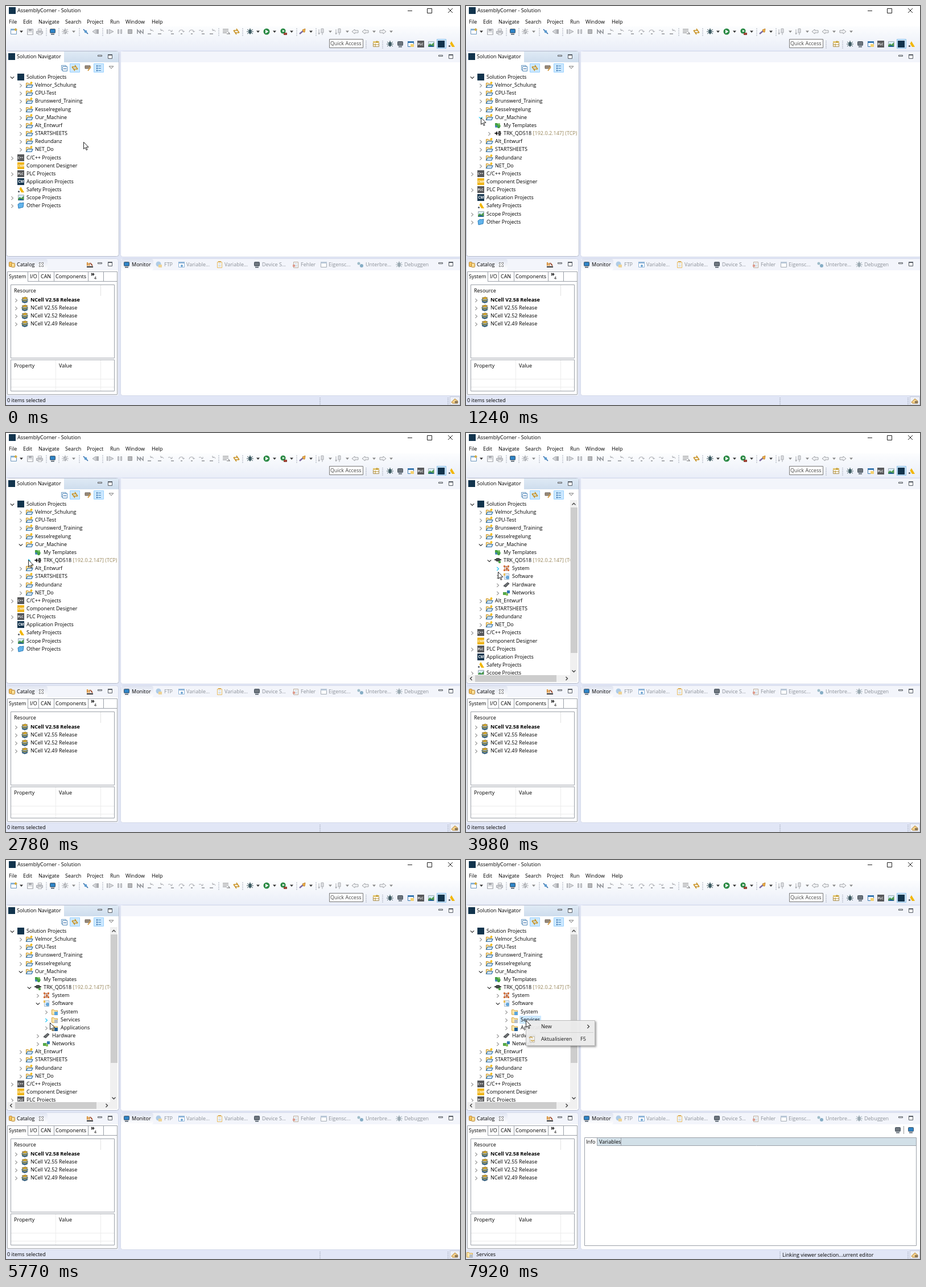
These frames come from a looping animation (798x702 px, 8 s). An HTML page with a canvas:

```html
<!DOCTYPE html>
<html lang="en">
<head>
<meta charset="utf-8">
<title>Project tree</title>
<style>
html, body { margin: 0; width: 100%; height: 100%; overflow: hidden; background: #e1e6f6; }
canvas { display: block; }
</style>
</head>
<body>
<canvas id="stage" width="798" height="702"></canvas>
<script>
const ctx = document.getElementById('stage').getContext('2d');
const LOOP = 8000, ROW = 14.15, TOP = 125;
const NAVY = '#12344d', GOLD = '#f2b705', GREY = '#a9abb0', DARK = '#555b63', BLUE = '#3d7fb8', LINE = '#b6bccc', BORDER = '#9ba0a8';
const OPEN_ROOT = 1230, OPEN_DEVICE = 3180, OPEN_SOFTWARE = 4610, SELECT = 6970, MENU = 7840;

// ---- drawing helpers ----
function box(x, y, w, h, fill, stroke, r = 0) {
  ctx.beginPath();
  ctx.roundRect(stroke ? x + .5 : x, stroke ? y + .5 : y, stroke ? w - 1 : w, stroke ? h - 1 : h, r);
  if (fill) { ctx.fillStyle = fill; ctx.fill(); }
  if (stroke) { ctx.strokeStyle = stroke; ctx.lineWidth = 1; ctx.stroke(); }
}
function path(d, fill, stroke, width = 1) {
  const p = new Path2D(d);
  if (fill) { ctx.fillStyle = fill; ctx.fill(p); }
  if (stroke) { ctx.strokeStyle = stroke; ctx.lineWidth = width; ctx.stroke(p); }
}
function dot(x, y, r, fill) {
  ctx.beginPath();
  ctx.arc(x, y, r, 0, 7);
  ctx.fillStyle = fill;
  ctx.fill();
}
function text(s, x, y, color = '#000', weight = 400, size = 9) {
  ctx.font = `${weight} ${size}px "Open Sans", sans-serif`;
  ctx.fillStyle = color;
  ctx.fillText(s, x, Math.round(y + 3.3));
  return ctx.measureText(s).width;
}
function at(x, y, draw) {
  ctx.save();
  ctx.translate(x, y);
  draw();
  ctx.restore();
}
const shape = (x, y, ...args) => at(x, y, () => path(...args));
const icon = (name, x, y) => at(x, y, icons[name]);
function shade(y0, y1, a, b) {
  const g = ctx.createLinearGradient(0, y0, 0, y1);
  g.addColorStop(0, a);
  g.addColorStop(1, b);
  return g;
}
function badge(s, fill) {
  box(-6, -6, 12, 12, fill);
  text(s, s.length > 2 ? -5.5 : -4.8, -1, '#fff', 700, s.length > 2 ? 5.5 : 6.5);
}
function folder(mark) {
  path('M-5.5 5V-3.5H-2L-1 -2H4.5V5Z', '#fbe7ad', '#d3a341');
  box(-1, 0, 6, 6, mark);
}
function screen(color) {
  box(-5, -5, 10, 8, color, '#44505c', 1);
  box(-3, 4, 6, 1.5, '#44505c');
}
function bug(color) {
  path('M-5 -4L5 4M5 -4L-5 4M-6 0H6M0 -6V5', '', color);
  ctx.beginPath();
  ctx.ellipse(0, 0, 2.5, 4, 0, 0, 7);
  ctx.fillStyle = color;
  ctx.fill();
}
function page(border, mark) {
  box(-4, -5, 9, 11, '#fff', border);
  path('M-2 -2H3M-2 1H3M-2 3H3', '', mark);
}
function frame(border, bar) {
  box(-5, -5, 11, 10, '#fff', border);
  box(-5, -5, 11, 3, bar);
}

const icons = {
  app: () => box(-6, -6, 12, 12, NAVY),
  solution() {
    path('M-5.5 4.5V-3.5H-2L-1 -2H4V1', '#fbe3a0', '#c8922e');
    path('M-5.5 4.5L-3 0H6L4 4.5Z', '#d5e9f8', '#2f6fa8', 1.2);
    path('M3.5 -6V-2M1.5 -4H5.5', '', GOLD, 1.5);
  },
  cpp: () => badge('C++', '#58595b'),
  plc: () => badge('PLC', '#58595b'),
  cm: () => badge('CM', '#16364f'),
  cmp: () => badge('CMP', '#f0b51a'),
  safety() {
    path('M-2.5 -1L0 -5L6 5H1Z', GOLD);
    dot(-3.5, 3.5, 1.6, DARK);
  },
  scope() {
    box(-5, -5, 11, 10, '#d9edf7', '#9eabb5');
    path('M-5 5V2L-2 -1L1 1L5 -3V5Z', '#4c9a4c');
    path('M-5 5L-1 2L5 4V5Z', '#1f5f94');
  },
  other: () => path('M-5 -2L-1 -5L0 -4L5 -5L4 3L-4 5Z', '#62b4ec', '#2b7cba'),
  templates() {
    path('M-5 -4H-1L1 -2H3L5 1L3 5H0L-3 1H-5Z', '#45a044');
    dot(-3, 2, 2, BLUE);
    dot(2, -2, 2, '#74bd5d');
  },
  device() {
    path('M-6 0H6', '', '#777', 2);
    path('M-5 0L-1 -4V4Z', '#222');
    box(1, -4, 4, 8, '#666', '#333');
  },
  linked() {
    path('M-6 -1H6', '', '#444', 2);
    box(-4, -4, 8, 6, '#46504c', '#333', 2);
    dot(3, 3, 2.3, '#55a84b');
  },
  system() {
    path('M-4 -3H4M-4 3H4M-3 -4V4M3 -4V4M0 -4V5', '', '#a5583a');
    for (const [x, y] of [[-4, -4], [3, -4], [-4, 3], [3, 3], [0, 0]]) box(x - 1, y - 1, 3, 3, '#d2703a');
  },
  software() {
    page('#9bb4ca', '#9fc4e5');
    dot(2, 2, 3, '#63a6d9');
    box(-5, -5, 3, 4, '#e9bd58');
  },
  hardware: () => path('M-5 2L2 -4L5 -2L-1 4Z', '#6e7275', '#3b3e41'),
  networks() {
    path('M-4 2L4 -2', '', '#777');
    box(-6, -1, 6, 5, '#55a84b');
    box(1, -4, 5, 5, '#3479b5');
    box(-1, 1, 4, 4, '#83bd55');
  },
  sysFolder: () => folder('#5ba6dc'),
  services: () => folder('#b6bdc5'),
  apps: () => folder('#1f5c94'),
  books() {
    path('M-5 -3L1 -5L5 -3L0 -1Z', '#f0b929', '#7a6324');
    path('M-5 -1L0 1L5 -1V1L0 3L-5 1Z', '#d9b03a', '#24505c');
    path('M-5 2L0 4L5 2V4L0 6L-5 4Z', '#1d4b6d');
  },
  catalog() {
    box(-5, -5, 6, 9, '#f6c45e', '#b9832c', 1);
    box(-1, -3, 7, 8, '#f8dd96', '#b9832c', 1);
  },
  monitor: () => screen('#2f83c5'),
  darkScreen: () => screen('#6d757d'),
  ftp() { dot(-1, -1, 4.5, '#aecbe5'); box(-1, 0, 6, 5, '#eed394'); },
  vars() { frame('#8fb5d8', '#8fb5d8'); dot(1, 2, 2, '#6fa5d2'); },
  clip() { page('#e3b75f', '#b9c6d2'); box(-2, -6, 5, 2, '#d8a64d'); },
  errors() { page('#b9aa9a', '#b3c4d5'); box(-5, 0, 4, 4, '#df9b8d'); },
  props: () => frame('#a3aab3', '#b8c7d7'),
  breaks() { dot(-3, -2, 2.5, '#9fbdc9'); dot(2, 2, 3, '#85adc5'); },
  paleBug: () => bug('#9aa9b1'),
  darkBug: () => bug('#3c5960'),
  perspective() { frame('#a48a4c', '#e2c56f'); path('M-1 -1V5M-5 1H5M2 -6V-2M0 -4H5', '', '#b68e29'); },
  window() { frame('#3777b0', '#3777b0'); box(0, 0, 6, 5, '#f4d170'); },
  create() { frame('#6a94bb', '#85b2d8'); path('M4 -6V-1M1.5 -3.5H6.5', '', '#e9ad24', 1.5); },
  save() { box(-5, -5, 11, 11, '#dfe1e4', GREY); box(-2, -5, 5, 4, GREY); box(-3, 2, 7, 3, '#fff'); },
  print() { box(-3, -5, 7, 4, '#fff', GREY); box(-6, -1, 12, 5, '#d0d2d6', GREY); box(-3, 2, 7, 4, '#fff', GREY); },
  gears() { bug(GREY); path('M-4 4L4 -4', '', '#cfd1d4', 2); },
  skip() { path('M-4 -4L4 4', '', '#245f9e', 1.5); dot(0, 0, 2.4, '#5c9bd0'); },
  resume() { path('M-5 -4V4', '', GREY, 2); path('M-2 -4L6 0L-2 4Z', '#d5d7da', GREY); },
  back() { path('M1 -4V4L-5 0Z', '#d5d7da', GREY); box(2, -4, 4, 8, GREY); },
  pause() { box(-4, -4, 3, 8, '#d5d7da', GREY); box(1, -4, 3, 8, '#d5d7da', GREY); },
  stop: () => box(-4, -4, 8, 8, '#b5b7bb', '#999'),
  cut: () => path('M-5 4V-3L0 3V-2L5 3V-4', '', '#8d9095', 1.5),
  stepIn() { path('M-5 -2Q-1 -4 1 0M-1 0H2V-3', '', GREY); box(0, 3, 5, 2, GREY); },
  stepOver() { path('M-4 1Q-4 -3 0 -3Q4 -3 4 0M2 -1L4 1L6 -1', '', GREY); box(-1, 3, 3, 2, GREY); },
  stepOut() { path('M5 0Q4 -4 0 -2M0 -5V-2H3', '', GREY); box(-5, 3, 6, 2, GREY); },
  lines: () => path('M-6 -4H4M-6 -1H4M-6 2H1M1 4H6L4 1', '', '#777', 1.2),
  link: () => path('M-5 -2H2L0 -5M5 2H-2L0 5M-5 -2L-2 2M5 2L2 -2', '', '#c99224', 1.6),
  run() { dot(0, 0, 5.5, '#2b8a45'); path('M-2 -3.2L3.5 0L-2 3.2Z', '#fff'); },
  runTool() { dot(-1, -1, 4.6, '#2b8a45'); path('M-2 -3L2 -1L-2 1Z', '#fff'); box(0, 2, 6, 4, '#b9503c', '#7b3428'); },
  torch() { path('M-5 4L1 -1', '', '#7c6aa0', 2.5); path('M0 -3L5 -5L4 1L2 1Z', '#f3b44a', '#c0812a'); },
  pin: () => path('M-1 -5H3V2H-1ZM1 2V6M-5 -4V4M-6 2L-5 5L-3 2', '#dfe1e4', GREY),
  left: () => path('M-6 0L-1 -4V-2H5V2H-1V4Z', '#f2f3f5', '#9fa2a7'),
  right: () => path('M6 0L1 -4V-2H-5V2H1V4Z', '#f2f3f5', '#9fa2a7'),
  collapse() { box(-5, -5, 9, 9, '#fff', '#6b9bc5'); box(-3, -3, 9, 9, '#fff', '#4f86b7'); path('M-1 1.5H4', '', '#245f9e'); },
  filter() { path('M-5 -4H4V1H-5Z', '#9a8b78', '#6a6058'); path('M0 5L5 -2', '', '#d59c45', 2); },
  tree() { path('M-1 -3.5H4M-1 .5H4M-1 4.5H4', '', BLUE); path('M-4 -3.5H-2M-4 .5H-2M-4 4.5H-2', '', '#245f9e', 2); },
  shelf() { path('M-5 4H6', '', '#333', 2); path('M-4 2V-4M-1 2V-3', '', '#d58524', 2); path('M1 -3L5 2', '', '#9b4a2c', 2); },
  hint() { path('M-6 2L0 -4L5 0V4H-4Z', '#f3d08a', '#b48536'); box(0, 0, 5, 4, '#8d795a'); },
  refresh() { page('#b8b2a2', '#d5c8a3'); path('M-5 -2Q-2 -5 1 -2M4 2Q1 5 -2 2', '', '#c79b3b', 1.6); },
  drop: () => path('M-3 -1.5H3L0 2Z', '#333'),
  paleDrop: () => path('M-3 -1.5H3L0 2Z', '#888'),
  grip() { for (let y = -6; y < 8; y += 3) box(-.5, y, 1, 1.5, '#8f96a5'); },
};

// ---- static window ----
const toolbar = [
  ['create', 13], ['drop', 27], ['save', 42], ['print', 59], ['grip', 71], ['monitor', 82], ['grip', 93], ['gears', 104],
  ['paleDrop', 119], ['grip', 129], ['skip', 140], ['back', 157], ['grip', 170], ['resume', 183], ['pause', 200],
  ['stop', 218], ['cut', 236], ['stepOut', 254], ['stepOut', 272], ['stepIn', 290], ['stepOver', 308], ['stepOver', 326],
  ['stepIn', 344], ['stepOut', 363], ['grip', 374], ['lines', 387], ['link', 405], ['grip', 416], ['darkBug', 429],
  ['drop', 443], ['run', 458], ['drop', 472], ['runTool', 488], ['drop', 502], ['grip', 511], ['torch', 521],
  ['drop', 536], ['grip', 545], ['pin', 555], ['paleDrop', 570], ['pin', 585], ['paleDrop', 600], ['left', 614],
  ['left', 632], ['paleDrop', 647], ['right', 662], ['paleDrop', 677],
];
const views = [
  ['monitor', 'Monitor', 221], ['ftp', 'FTP', 278], ['vars', 'Variable...', 317], ['clip', 'Variable...', 384],
  ['darkScreen', 'Device S...', 450], ['errors', 'Fehler', 518], ['props', 'Eigensc...', 567],
  ['breaks', 'Unterbre...', 632], ['paleBug', 'Debuggen', 700],
];

function minMax(x, y) {
  box(x - 4, y - 3, 8, 3, '#fff', DARK);
  box(x + 14, y - 4, 8, 8, '#fff', DARK);
  box(x + 14, y - 4, 8, 2, DARK);
}
function drawWindow() {
  box(0, 0, 798, 702, '#e1e6f6');
  box(0, 0, 798, 36, '#fff');
  box(0, 36, 798, 42, shade(36, 78, '#fcfdfe', '#eaeef8'));
  icon('app', 11, 8);
  text('AssemblyCorner - Solution', 20, 8);
  path('M706 8.5H714M777 4L785 12M785 4L777 12', '', '#222');
  box(740, 4, 9, 9, '', '#222');
  [['File', 5], ['Edit', 30], ['Navigate', 57], ['Search', 104], ['Project', 142], ['Run', 183], ['Window', 210], ['Help', 256]]
    .forEach(([s, x]) => text(s, x, 28));
  toolbar.forEach(([name, x]) => icon(name, x, 45));

  box(568, 58, 60, 16, '#fff', '#777');
  text('Quick Access', 570, 66, '#444', 400, 9.1);
  box(757, 58, 17, 17, '#cce4f7', '#8fc3ec');
  [['grip', 633], ['perspective', 650], ['grip', 662], ['darkBug', 675], ['darkScreen', 693], ['window', 711],
    ['plc', 729], ['scope', 747], ['app', 765], ['safety', 783]].forEach(([name, x]) => icon(name, x, 67));

  // navigator
  box(0, 79, 199, 362, '#fff', LINE, 4);
  box(1, 80, 197, 19, shade(80, 99, '#dfeaf5', '#cedded'));
  box(1, 80, 101, 20, '#fff');
  icon('app', 10, 89);
  text('Solution Navigator', 19, 89);
  minMax(165, 89);
  box(112, 101, 18, 16, '#cce8ff', '#99d1ff');
  box(154, 101, 18, 16, '#cce8ff', '#99d1ff');
  [['collapse', 102], ['link', 121], ['filter', 144], ['tree', 163]].forEach(([name, x]) => icon(name, x, 109));
  shape(185, 107, 'M-4 -1H4L0 3Z', '#fff', '#777');

  // editor
  box(201, 79, 600, 363, '#fff', '#d5daea', 4);
  box(202, 80, 596, 19, '#f3f5fb');
  minMax(764, 89);

  // catalog
  box(0, 444, 198, 242, '#f3f5fb', '#d5daea', 4);
  box(1, 445, 72, 20, shade(445, 465, '#e1e6f2', '#fff'), '', 4);
  box(1, 465, 196, 220, '#fff');
  box(2, 467, 194, 217, '#fff', BORDER);
  icon('catalog', 10, 455);
  text('Catalog', 19, 455);
  shape(62, 455, 'M-3.5 -3.5H-1.5L0 -2L1.5 -3.5H3.5V-2L2 0L3.5 2V3.5H1.5L0 2L-1.5 3.5H-3.5V2L-2 0L-3.5 -2Z', '#fff', '#666', .9);
  icon('shelf', 147, 455);
  minMax(165, 454);
  path('M38.5 467V485M57.5 467V485M84.5 467V485M144.5 467V485M171.5 467V485M38 484.5H195', '', BORDER);
  [['System', 5], ['I/O', 42], ['CAN', 61], ['Components', 87]].forEach(([s, x]) => text(s, x, 476));
  text('»', 149, 472, '#000', 700, 11);
  text('4', 155, 478, '#000', 400, 7);
  box(8, 490, 183, 130, '#fff', BORDER);
  text('Resource', 14, 501);
  path('M166.5 491V510', '', '#e2e2e2');
  [58, 55, 52, 49].forEach((n, i) => {
    const y = Math.round(517 + i * ROW);
    arrow(18, y + 1, false, '#999');
    icon('books', 33, y);
    text(`NCell V2.${n} Release`, 43, y, '#000', i ? 400 : 700);
  });
  box(8, 622, 183, 56, '#fff', BORDER);
  path('M87.5 623V677M166.5 623V677M9 656.5H190M9 670.5H190', '', '#ececec');
  text('Property', 14, 633);
  text('Value', 93, 633);

  // lower views
  box(201, 444, 600, 242, '#fff', '#d5daea', 4);
  box(202, 445, 596, 20, '#f3f5fb');
  box(202, 445, 57, 20, shade(445, 465, '#dfe4f1', '#fff'), '', 4);
  views.forEach(([name, label, x], i) => {
    icon(name, x - 9, 455);
    text(label, x, 455, i ? '#8b9098' : '#000');
  });
  minMax(764, 454);

  icon('grip', 552, 695);
  icon('grip', 777, 695);
  box(780, 687, 18, 15, '#eef0f8', '#c3c8d8');
  icon('hint', 789, 695);
}

// ---- tree: depth, icon, label, opening time (null = leaf), first shown ----
const NEVER = Infinity;
const tree = [
  [0, 'app', 'Solution Projects', 0],
  [1, 'solution', 'Velmor_Schulung', NEVER],
  [1, 'solution', 'CPU-Test', NEVER],
  [1, 'solution', 'Brunswerd_Training', NEVER],
  [1, 'solution', 'Kesselregelung', NEVER],
  [1, 'solution', 'Our_Machine', OPEN_ROOT],
  [2, 'templates', 'My Templates', null, OPEN_ROOT],
  [2, 'device', 'TRK_QD518', OPEN_DEVICE, OPEN_ROOT],
  [3, 'system', 'System', NEVER, OPEN_DEVICE],
  [3, 'software', 'Software', OPEN_SOFTWARE, OPEN_DEVICE],
  [4, 'sysFolder', 'System', NEVER, OPEN_SOFTWARE],
  [4, 'services', 'Services', NEVER, OPEN_SOFTWARE],
  [4, 'apps', 'Applications', NEVER, OPEN_SOFTWARE],
  [3, 'hardware', 'Hardware', NEVER, OPEN_DEVICE],
  [3, 'networks', 'Networks', NEVER, OPEN_DEVICE],
  [1, 'solution', 'Alt_Entwurf', NEVER],
  [1, 'solution', 'STARTSHEETS', NEVER],
  [1, 'solution', 'Redundanz', NEVER],
  [1, 'solution', 'NET_Do', NEVER],
  [0, 'cpp', 'C/C++ Projects', NEVER],
  [0, 'cmp', 'Component Designer', null],
  [0, 'plc', 'PLC Projects', NEVER],
  [0, 'cm', 'Application Projects', null],
  [0, 'safety', 'Safety Projects', null],
  [0, 'scope', 'Scope Projects', NEVER],
  [0, 'other', 'Other Projects', NEVER],
];

function arrow(x, y, open, color) {
  shape(x, y, open ? 'M-3.2 -1.7L0 1.5L3.2 -1.7' : 'M-1.7 -3.2L1.5 0L-1.7 3.2', '', color, 1.2);
}
function drawTree(t, [mx, my]) {
  const scrolls = t >= OPEN_DEVICE;
  const hovered = Math.round((my - TOP) / ROW);
  ctx.save();
  ctx.beginPath();
  ctx.rect(1, 118, scrolls ? 182 : 196, scrolls ? 307 : 321);
  ctx.clip();
  tree.filter(row => t >= (row[4] || 0)).forEach(([depth, name, label, opens], i) => {
    const x = 36 + 15 * depth, y = Math.round(TOP + i * ROW);
    const open = t >= opens, over = i === hovered;
    const selected = name === 'services' && t >= SELECT;
    ctx.font = '400 9px "Open Sans", sans-serif';
    const w = ctx.measureText(label).width;
    if (selected || over && mx >= x - 17 && mx <= x + w + 2) {
      box(x - 2, y - 7, w + 4, 14, selected ? '#cce8ff' : '#e5f3ff');
    }
    if (opens !== null) {
      arrow(x - 25, y + 1, open, over && Math.abs(mx - x + 25) < 7 ? '#1cc4f7' : open ? '#333' : '#999');
    }
    icon(name === 'device' && open ? 'linked' : name, x - 10, y);
    text(label, x, y);
    if (name === 'device') text('[192.0.2.147] (TCP)', x + w + 2.5, y, '#98865a');
  });
  ctx.restore();
  if (scrolls) drawScrollbars(t >= OPEN_SOFTWARE ? 357 : 387);
}
function drawScrollbars(thumbEnd) {
  box(183, 118, 13, 308, '#f0f0f0');
  box(2, 426, 194, 12, '#f0f0f0');
  box(184, 131, 12, thumbEnd - 131, '#cdcdcd');
  box(16, 426, 143, 12, '#cdcdcd');
  path('M186.5 126.5L189.5 123.5L192.5 126.5M186.5 417.5L189.5 420.5L192.5 417.5M10.5 429L7.5 432L10.5 435M175.5 429L178.5 432L175.5 435', '', '#444', 1.4);
}

// ---- pointer: start, end, steps, then evenly timed waypoints ----
const moves = [
  [150, 680, 8, [136, 239], [88, 214], [54, 203], [36, 199], [31, 199]],
  [850, 1000, 3, [31, 199], [26, 196]],
  [1710, 2450, 10, [26, 196], [52, 204], [56, 211], [47, 220], [40, 223], [31, 214]],
  [2700, 2780, 2, [31, 214], [39, 223]],
  [3580, 3580, 1, [39, 223], [41, 223]],
  [3730, 4230, 7, [41, 223], [56, 243], [56, 251]],
  [5080, 5600, 8, [56, 251], [68, 262], [80, 277], [82, 283], [77, 285]],
  [5770, 5850, 2, [77, 285], [77, 286], [75, 285]],
  [6120, 6340, 4, [75, 285], [103, 284]],
  [6970, 7140, 3, [103, 284], [105, 282]],
];
function pointer(t) {
  const move = moves.findLast(m => t >= m[0]);
  if (!move) return moves[0][3];
  const [start, end, steps, ...points] = move;
  const step = Math.min(steps, 1 + Math.floor((t - start) / (end - start || 1) * (steps - 1) + .01));
  const f = step / steps * (points.length - 1);
  const i = Math.min(Math.floor(f), points.length - 2);
  return points[i].map((v, k) => Math.round(v + (points[i + 1][k] - v) * (f - i)));
}

function drawStatus(t) {
  if (t < SELECT) return text('0 items selected', 2, 694);
  icon('services', 7, 694);
  text('Services', 18, 694);
  if (t >= MENU) text('Linking viewer selection...urrent editor', 556, 695);
}
function drawMonitor() {
  icon('darkScreen', 759, 475);
  path('M769.5 468V482', '', '#999');
  icon('monitor', 782, 475);
  box(208, 488, 584, 191, '#fff', BORDER);
  box(209, 489, 582, 13, '#d2e0e8');
  box(209, 489, 21, 14, '#fff');
  path('M230.5 488V502.5H791M272.5 488V502', '', BORDER);
  text('Info', 211, 496);
  text('Variables', 234, 496);
}
function drawMenu(alpha) {
  ctx.save();
  ctx.globalAlpha = alpha;
  ctx.shadowColor = '#0006';
  ctx.shadowBlur = 3;
  ctx.shadowOffsetX = ctx.shadowOffsetY = 2;
  box(105, 282, 122, 45, '#f2f2f2');
  ctx.shadowColor = 'transparent';
  box(105, 282, 122, 45, '', '#b5b5b5');
  text('New', 132, 293);
  arrow(215, 293, false, '#222');
  path('M130 303.5H224', '', '#d0d0d0');
  icon('refresh', 116, 315);
  text('Aktualisieren', 132, 315);
  text('F5', 201, 315);
  ctx.restore();
}

function draw() {
  const t = performance.now() % LOOP, tip = pointer(t);
  drawWindow();
  drawTree(t, tip);
  drawStatus(t);
  if (t >= MENU) {
    drawMonitor();
    drawMenu(t < MENU + 80 ? .5 : .92);
  }
  shape(...tip, 'M.5 .5V12.5L3.2 10L5.2 14.5L7 13.7L5.1 9.3H9Z', '#fff', '#222');
  requestAnimationFrame(draw);
}
draw();
</script>
</body>
</html>
```
